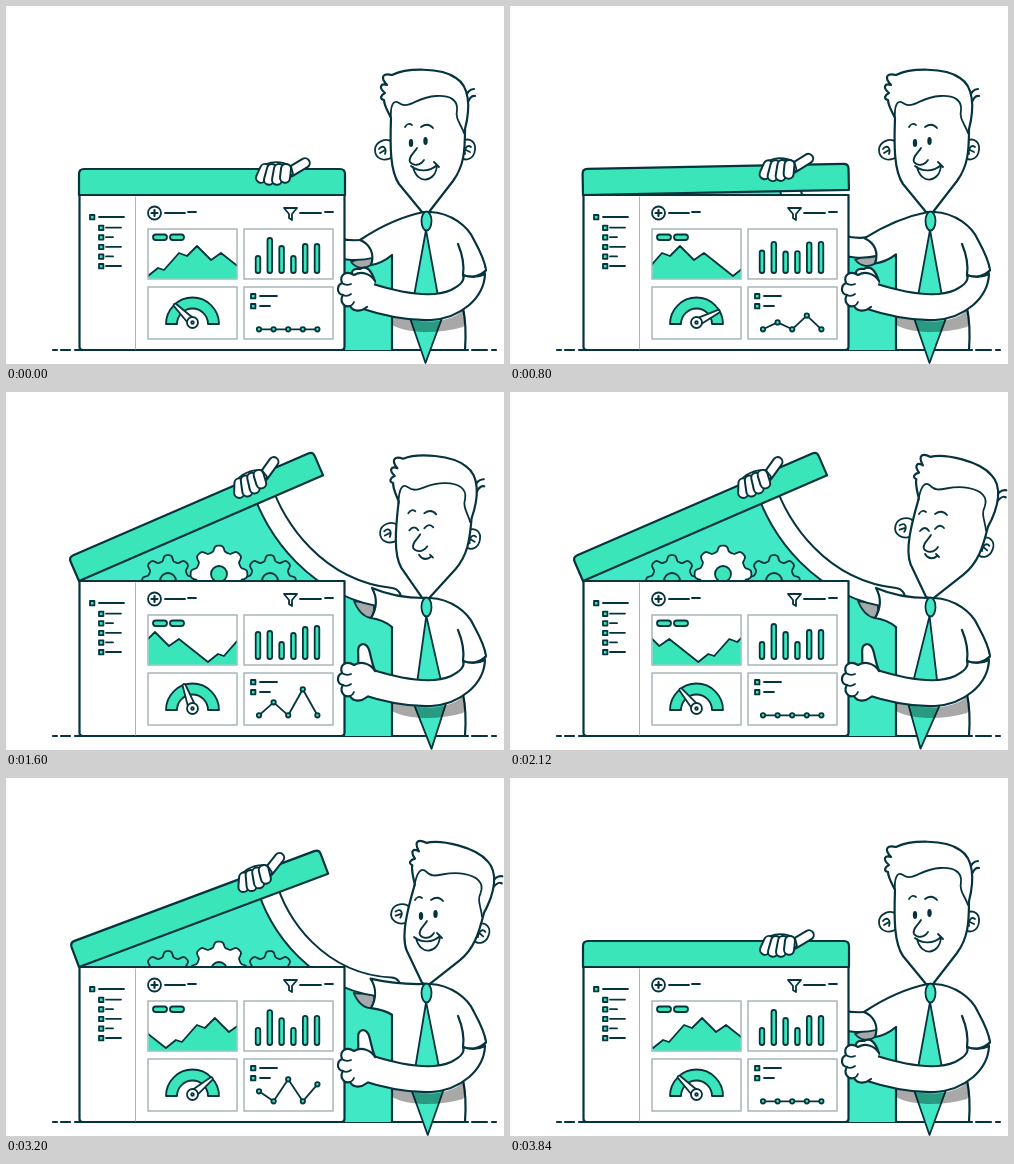
An HTML page that plays this animation: 498 by 358 pixels, repeating every 3.88 s.

```html
<!DOCTYPE html>
<html lang="en">
<head>
<meta charset="utf-8">
<title>Dashboard toolbox</title>
<style>
html, body { margin: 0; width: 100%; height: 100%; overflow: hidden; background: #fff; }
svg { display: block; width: 498px; height: 358px; }
.l { fill: none; stroke: #06343e; stroke-width: 2.2; stroke-linecap: round; stroke-linejoin: round; }
.w { fill: #fff; }
.g { fill: #3be5ba; }
.b { fill: #40e8c5; }
.t { stroke-width: 1.8; }
.card { fill: #fff; stroke: #a3b1b4; stroke-width: 1.4; }
.rule { stroke: #c3acb0; stroke-width: 1; }
.grey { fill: #a5a9a9; }
.shade { fill: #000; opacity: .34; }
.eye { fill: #06343e; }
</style>
</head>
<body>
<svg id="stage" viewBox="0 0 498 358"></svg>
<script>
const LOOP = 3880, STEP = 40;
const stage = document.getElementById('stage');

// Markup helpers
const path = (d, cls = 'l', id = '') => `<path id="${id}" class="${cls}" d="${d}"/>`;
const box = (x, y, w, h, cls, r = 0, id = '') =>
  `<rect id="${id}" class="${cls}" x="${x}" y="${y}" width="${w}" height="${h}" rx="${r}"/>`;
const dot = (x, y, r, cls, id = '') => `<circle id="${id}" class="${cls}" cx="${x}" cy="${y}" r="${r}"/>`;
const tube = (d, width, id = '') => ['#06343e', '#fff'].map((c, i) =>
  `<path id="${id}${i}" d="${d}" fill="none" stroke="${c}" stroke-width="${width - 4 * i}" stroke-linecap="round"/>`).join('');
const bullet = (x, y, gap, len) => box(x - 2, y - 2, 4.4, 4.4, 'l g t') + path(`M${x + gap} ${y}h${len}`, 'l t');
const repeat = (n, make) => Array.from({ length: n }, (_, i) => make(i)).join('');

function gear(x, y, R, cls) {
  const rim = repeat(129, i => {
    const a = i / 64 * Math.PI;
    const r = R - 3 + 3 * Math.tanh(2 * Math.cos(8 * a));
    return `${i ? 'L' : 'M'}${(x + r * Math.sin(a)).toFixed(1)} ${(y - r * Math.cos(a)).toFixed(1)}`;
  });
  return path(rim + 'Z', `l ${cls} t`) + dot(x, y, 8, 'l g t');
}

// Two poses each: lid closed and open, mouth small and wide, thumb down and up
const SLEEVE = [
  'M418 206C398 210 375 220 354 234C364 238 369 248 365 259C372 258 380 254 386 249',
  'M418 206C398 206 380 202 366 196C371 205 371 216 365 226C372 227 380 230 386 235'];
const CUFF = [
  'M345 256C352 254 360 248 366 240C370 246 369 254 365 259C358 264 350 262 345 256Z',
  'M348 209C356 211 362 212 367 209C369 216 368 222 365 226C358 225 352 219 348 209Z'];
const ARM = ['C285 225 330 262 385 235', 'C268 135 310 198 385 206'];
const MOUTH = [
  'M412 163C415 168 420 168 424 165C421 168 416 169 412 163M423 163L426 166',
  'M405 160C412 166 424 166 431 159C430 177 411 179 407 161M428 156L433 161'];
const THUMB = [
  'M345 272C342 264 345 261 352 262C359 258 364 264 367 275',
  'M349 272C353 262 346 248 355 247C363 248 361 259 367 274'];
const BODY = 'V344H459C460 330 460 316 457 302L480 264C479 256 474 245 468 234C462 220 445 207 424 206Z';

const barX = i => 252 + 11.8 * i;
const nodeX = i => 253 + 14.6 * i;

stage.innerHTML = `
<defs><clipPath id="win"><rect x="142.600" y="223" width="88" height="49.500"/></clipPath></defs>
${path('M47 344H51M55 344H64M69 344H462M466 344H481M486 344H490')}
${path('', 'b', 'inside')}
<g id="gears">${gear(162, 189, 26, 'b')}${gear(264, 189, 26, 'b')}${gear(213, 182, 28.5, 'w')}</g>
${path('', 'l grey t', 'cuff')}
${tube('', 22, 'arm')}
${path('', 'l w', 'torso')}
<g id="head">
  ${path('M386 136C380 131 369 136 369 144C369 153 379 157 388 150M373 143C377 138 381 142 379 148M374 147L379 144', 'l w t')}
  ${path('M456 135C464 131 470 136 469 144C468 153 460 156 454 151M465 141C461 138 458 143 459 148M464 146L460 144', 'l w t')}
  ${path('M459 93C460 87 464 83 468 83M461 98C463 93 466 89 469 90')}
  ${path('M385 112C381 104 378 99 378 94C373 93 375 89 379 87C372 81 375 77 381 79C373 70 378 67 386 69C400 62 435 61 450 72C463 80 465 100 459 123C459 145 458 160 447 175L423 206L416 206L393 178C384 165 384 140 385 112Z', 'l w')}
  ${path('M385 114C384 100 387 93 393 97C403 104 410 91 430 90C444 89 452 94 451 104C449 113 455 118 458 127', 'l t')}
</g>
<g id="face">
  ${path('M399 121Q402 116 406 119M415 121Q422 116 427 122', 'l t')}
  ${path('M400 138Q405 132 409 138M415 136Q420 130 424 135', 'l t', 'lids')}
  <g id="eyes"><ellipse class="eye" cx="405" rx="2.200" ry="4"/><ellipse class="eye" cx="419.500" cy="-2" rx="2.200" ry="4"/></g>
  ${path('M411 142C408 147 402 151 404 156C407 160 414 160 418 154', 'l t')}
</g>
${path('', 'l w t', 'mouth')}
${path('M420 224L436 312L419.500 357L404 312Z', 'l b t', 'tie')}
<ellipse class="l b t" cx="420.500" cy="215" rx="5" ry="9.500"/>
${path('M386 307C410 319 440 319 458 304C460 312 460 318 457 321C430 329 400 327 386 319Z', 'shade')}
${path('M77 344Q73.500 344 73.500 341V189H338.500V341Q338.500 344 335 344Z', 'l w')}
${path('M129.500 191V343', 'l rule')}
${bullet(86, 211, 7, 25)}
${repeat(5, i => bullet(95, 221.6 + 9.6 * i, 5, 11 + 4 * Math.cos(Math.PI * i)))}
${dot(148.5, 207, 6.5, 'l w t')}${path('M145.500 207h6M148.500 204v6')}
${path('M159 207h20M182 206h8M294 207h21M319 206h8', 'l t')}
${path('M278 202H291L286 208V214L283 212V208Z', 'l t')}
${repeat(4, i => box(142 + 96 * (i % 2), i < 2 ? 223 : 281, 89, i < 2 ? 50 : 52, 'card'))}
<g clip-path="url(#win)">${path('', 'g', 'area')}${path('', 'l t', 'ridge')}</g>
${repeat(2, i => box(147 + 17 * i, 228.5, 14, 5.5, 'l g t', 2.7))}
${repeat(6, i => box(barX(i) - 2.3, 240, 4.6, 27, 'l g t', 2.3, 'bar' + i))}
${path('M160 318A26.500 26.500 0 0 1 213 318H202A15.500 15.500 0 0 0 171 318Z', 'l g t')}
${path('M183 313L185 291.500Q186.500 289.500 188 291.500L190 313Z', 'l w t', 'needle')}
${dot(186.5, 316.5, 5.5, 'l w t')}${dot(186.5, 316.5, 1.3, 'l t')}
${bullet(247, 290, 7, 17)}${bullet(247, 300, 7, 10)}
${path('', 'l t', 'trend')}
${repeat(5, i => dot(nodeX(i), 323, 2.2, 'l g t', 'node' + i))}
<g id="lid">
  ${path('M73 189V168Q73 163 78 163H334Q339 163 339 168V189Z', 'l g')}
  ${tube('M284 166L299 157', 11.5)}
  ${path('M254 166C255 156 272 153 285 160L287 168L280 174Z', 'l w t')}
  ${repeat(4, i => tube(`M${259 + 7 * i} 163L${255 + 8 * i} ${174 - (i - 1.5) ** 2}`, 12))}
</g>
${path('M452 238C457 250 458 262 457 269C464 272 474 271 480 264', 'l w')}
${path('M479 268C478 292 455 312 425 314C400 315 375 309 354 302L364 277C395 287 425 293 445 284C455 279 459 274 457 269C465 272 473 271 479 268Z', 'l w')}
<g id="fist">
  ${path('', 'l w', 'thumb')}
  ${path('M367 274C362 266 353 264 346 268C338 263 331 268 334 276C328 279 329 287 335 288C331 294 336 301 342 299C346 306 354 304 359 300', 'l w')}
  ${path('M334 276Q338 279 343 277M335 288Q339 290 343 287M342 299Q345 298 346 295', 'l t')}
</g>`;

const el = id => document.getElementById(id);
const set = (id, attrs) => { for (const k in attrs) el(id).setAttribute(k, attrs[k]); };
const lerp = (a, b, p) => a + (b - a) * p;

function mix([a, b], p) {
  const to = b.match(/[\d.]+/g);
  let i = 0;
  return a.replace(/[\d.]+/g, n => lerp(+n, +to[i++], p).toFixed(2));
}

// Cosine-eased keys: [time, value], ...
function key(t, ...ks) {
  if (t <= ks[0][0]) return ks[0][1];
  for (let i = 1; i < ks.length; i++) {
    const [t0, a] = ks[i - 1], [t1, b] = ks[i];
    if (t <= t1) return lerp(a, b, (1 - Math.cos(Math.PI * (t - t0) / (t1 - t0))) / 2);
  }
  return ks[ks.length - 1][1];
}
// Rises from 0 to 1 over a..b and falls back over c..d
const pulse = (t, a, b, c, d) => key(t, [a, 0], [b, 1], [c, 1], [d, 0]);

const HILLS = [[0, 270], [10, 262], [16, 264], [31, 247], [39, 250], [49, 240], [63, 254], [73, 247]];
const PERIOD = 102;
const LOW = [17, 35, 27, 17, 29, 29], HIGH = [27, 28, 17, 26, 32, 33];

function drawCharts(t) {
  const scroll = PERIOD * t / LOOP;
  const ridge = 'M' + repeat(3, k =>
    HILLS.map(([x, y]) => `L${(142 + x + PERIOD * k - scroll).toFixed(2)} ${y}`).join('')).slice(1);
  set('ridge', { d: ridge });
  set('area', { d: ridge + 'V280H30Z' });

  const sway = pulse(t, 0, 1500, 1700, 2120) + pulse(t, 2160, 2560, 2700, 3240);
  LOW.forEach((low, i) => {
    const height = lerp(low, HIGH[i], sway);
    set('bar' + i, { y: 267 - height, height });
  });

  const turn = key(t, [80, -45], [800, 63], [1600, -20], [2120, -40], [2560, 50], [3200, 50], [3800, -45]);
  set('needle', { transform: `rotate(${turn} 186.5 316.5)` });

  const even = pulse(t, 100, 1450, 1600, 2100), odd = pulse(t, 2250, 3100, 3250, 3750);
  const ys = [10 * odd, 13 * even, 22 * odd, 26 * even, 17 * odd].map(h => 323.3 - h);
  ys.forEach((cy, i) => set('node' + i, { cy }));
  set('trend', { d: 'M' + ys.map((y, i) => nodeX(i) + ' ' + y).join('L') });
}

function drawBox(t) {
  const deg = key(t, [740, 0], [1200, 27], [1450, 23], [1600, 23.4], [2400, 23.4], [3120, 22], [3600, 0]);
  const lift = deg / 23.4;
  set('lid', { transform: `rotate(${-deg} 73 189)` });
  const drop = key(t, [760, 42], [1200, -3], [1400, 0], [3080, 0], [3450, 42]);
  set('gears', { transform: `translate(0 ${drop})` });

  // The wrist follows the lid on its arc
  const a = deg * Math.PI / 180, dx = 205, dy = -13;
  const wx = 73 + dx * Math.cos(a) + dy * Math.sin(a);
  const wy = 189 - dx * Math.sin(a) + dy * Math.cos(a);
  const reach = `${wx.toFixed(2)} ${wy.toFixed(2)}${mix(ARM, lift)}`;
  set('arm0', { d: 'M' + reach });
  set('arm1', { d: 'M' + reach });
  set('inside', { d: `M73 189L${reach}L386 344H339V189Z` });
  set('torso', { d: mix(SLEEVE, lift) + BODY });
  set('cuff', { d: mix(CUFF, lift) });
}

function drawMan(t) {
  // The head tilts about the chin while the features slide across it
  const tilt = key(t, [820, 0], [1120, 1], [1300, 1], [1560, .33], [1640, .33], [1950, 1], [3220, 1], [3480, 0]);
  set('head', { transform: `rotate(${14 * tilt} 420 206)` });
  set('face', { transform: `translate(${10 * tilt} ${tilt})` });

  const shut = pulse(t, 1100, 1180, 2360, 2440);
  set('eyes', { transform: `translate(0 137) scale(1 ${1 - shut})` });
  set('lids', { opacity: shut > .6 ? 1 : 0 });

  const smile = key(t, [900, 1], [1150, 0], [2700, 0], [3000, 1]);
  set('mouth', { d: mix(MOUTH, smile), transform: `translate(${3 * tilt} ${-tilt})` });

  const swing = key(t, [800, 0], [1200, -8], [1600, 6], [2080, -9], [2560, -6], [3000, 0], [3300, 3], [3600, 0]);
  set('tie', { transform: `rotate(${-swing * .41} 420 217)` });

  const up = pulse(t, 850, 1150, 3250, 3500);
  set('thumb', { d: mix(THUMB, up) });
  set('fist', { transform: `translate(2 ${1 + 4 * up})` });
}

const start = performance.now();
function tick() {
  const t = Math.floor((performance.now() - start) % LOOP / STEP) * STEP;
  drawCharts(t);
  drawBox(t);
  drawMan(t);
  requestAnimationFrame(tick);
}
tick();
</script>
</body>
</html>
```
